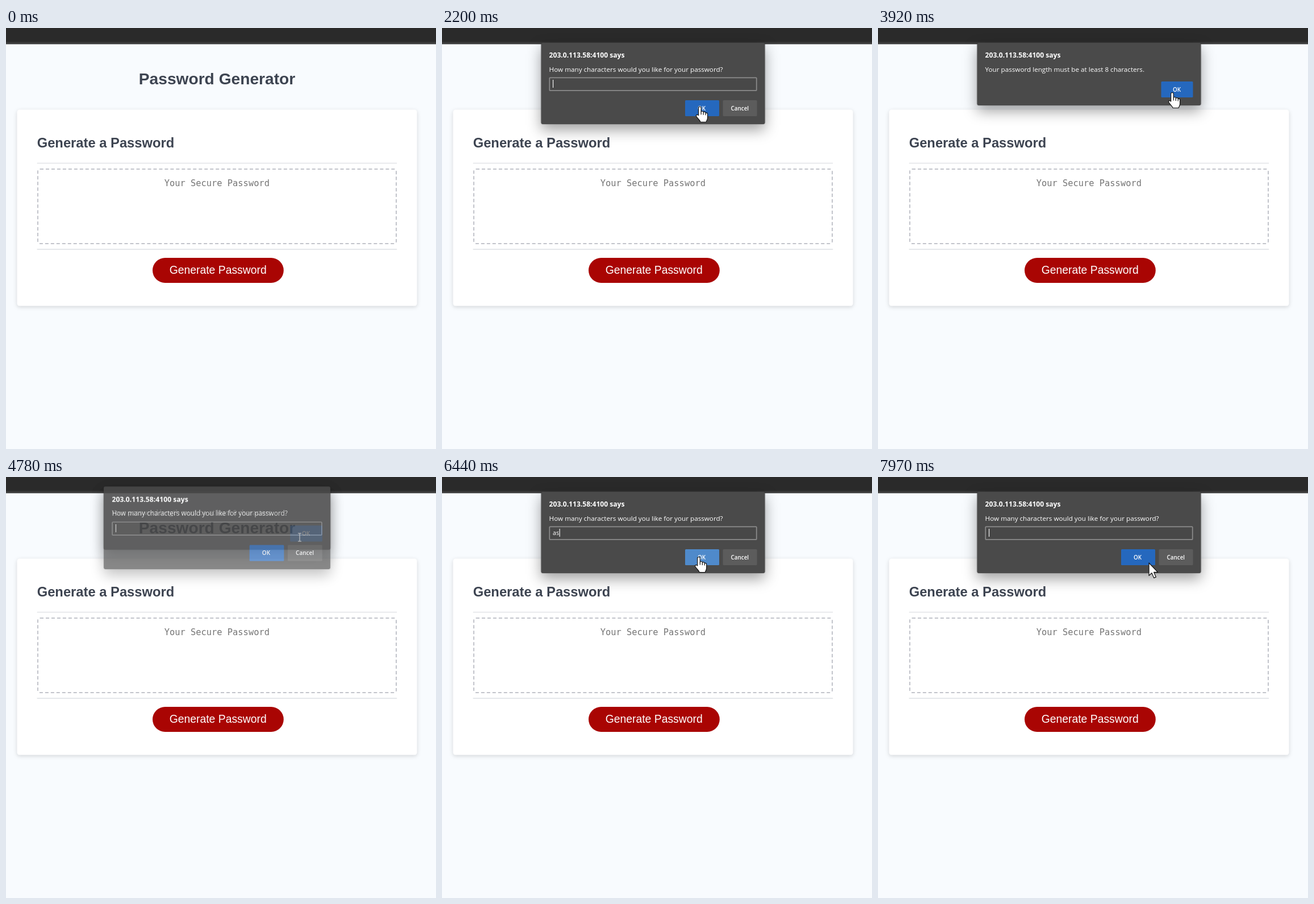
An HTML page for the animation above (8000 ms loop, 757x740 px).

```html
<!DOCTYPE html>
<html lang="en">
<head>
<meta charset="utf-8">
<title>Password Generator</title>
<style>
  html, body { margin: 0; width: 100%; height: 100%; overflow: hidden; background: #f8fbfe; }
  svg { position: absolute; left: 0; top: 0; }
  .field {
    position: absolute; left: 55px; top: 247px; width: 633px; height: 133px;
    box-sizing: border-box; border: 2px dashed #c2c4cb; border-radius: 5px;
  }
  .page { font-family: "Liberation Sans", Arial, sans-serif; fill: #3d4451; }
  .mid { text-anchor: middle; }
  .bold { font-weight: 700; }
  .hint { font: 15.4px "DejaVu Sans Mono", "Noto Sans Mono", monospace; fill: #757575; }
  .card { fill: #fff; filter: drop-shadow(0 2px 3.5px rgba(0, 0, 0, .15)); }
  .dialog { font: 11.68px "Open Sans", "Noto Sans", sans-serif; fill: #fff; }
  .panel {
    fill: #4a4a4a;
    filter: drop-shadow(0 0 1px rgba(0, 0, 0, .3)) drop-shadow(0 10px 12px rgba(0, 0, 0, .37));
  }
  .title { font-size: 12.1px; font-weight: 700; }
  .label { font-size: 9.9px; font-weight: 600; text-anchor: middle; }
  .value { font-size: 10.6px; }
  .box { fill: #484848; stroke: #8c8c8c; stroke-width: 1.7; }
  .closing .box { stroke: #6b7480; }
  .ok { fill: #2568be; }
  .ok.down { fill: #4f8acb; }
  .pointer { fill: #fff; stroke: #111; stroke-width: 1.2; stroke-linejoin: round; }
</style>
</head>
<body>
<svg class="page" width="757" height="740">
  <rect width="757" height="28.5" fill="#3b3b3b"/>
  <rect width="757" height="24.5" fill="#2a2a2a"/>
  <text class="mid bold" x="371.5" y="99" font-size="28.16">Password Generator</text>
  <rect class="card" x="19.5" y="143.5" width="704" height="345" rx="4.4"/>
  <text class="bold" x="54.7" y="210" font-size="23.76">Generate a Password</text>
  <path d="M54.6 237.7H688.2M54.6 389H688.2" stroke="#e5e7ea" stroke-width="1.8"/>
  <text class="hint mid" x="371.3" y="278">Your Secure Password</text>
  <rect x="258" y="404" width="230.8" height="44" rx="22" fill="#a90503"/>
  <text class="mid" x="373.2" y="432" font-size="19.36" fill="#fff">Generate Password</text>
</svg>
<div class="field"></div>
<svg width="757" height="740">
  <g id="dialogs">
    <g class="dialog" id="alert">
      <rect class="panel" x="174.5" y="26" width="394" height="110" rx="3"/>
      <text class="title" x="188.6" y="52">203.0.113.58:4100 says</text>
      <text id="notice" x="188.6" y="76.5"></text>
      <rect class="ok" x="498.5" y="94" width="56" height="28" rx="1.5"/>
      <text class="label" x="526" y="111.5">OK</text>
    </g>
    <g class="dialog" id="prompt">
      <rect class="panel" x="174.5" y="26" width="394" height="143" rx="3"/>
      <text class="title" x="188.6" y="52">203.0.113.58:4100 says</text>
      <text x="188.6" y="76.5">How many characters would you like for your password?</text>
      <rect class="box" x="189.3" y="87.3" width="364.4" height="22.6" rx="1"/>
      <text class="value" id="value" x="195" y="102"></text>
      <rect id="caret" y="91" width="1.1" height="14"/>
      <rect class="ok" x="428" y="127" width="60" height="28" rx="1.5"/>
      <text class="label" x="457" y="144.5">OK</text>
      <rect x="494.5" y="127" width="60" height="28" rx="1.5" fill="#5c5c5c"/>
      <text class="label" x="524.3" y="144.5">Cancel</text>
    </g>
  </g>
  <g id="cursor">
    <path class="pointer" id="arrow" d="M0 0V22.3L5 17.7L8.8 26.4L12.4 24.9L8.7 16.4H15.6Z"/>
    <g class="pointer" id="hand" transform="translate(-7.3)">
      <path d="M5 16V2.8a2.3 2.3 0 0 1 4.6 0V10c0-2 4-2 4 0v1c0-2 4-2 4 .5v1c0-1.8 3.4-1.6 3.4.8V20c0 4-2 5-2.5 7.5H8.5C8 25 4 22 1.2 17.5C0 15 3 13.5 5 16Z"/>
      <path d="M9.6 10v4.5M13.6 11v4M17.6 12.5v3" fill="none"/>
    </g>
    <path id="beam" d="M-3-7H3M0-7V7M-3 7H3" fill="none" stroke="#c9c9c9" stroke-width="1.1"/>
  </g>
</svg>
<script>
  const LOOP = 8000, STEP = 66.4, FADE = 160;
  const $ = id => document.getElementById(id);
  const clamp = v => Math.max(0, Math.min(1, v));
  const within = (t, spans) => spans.some(([a, b]) => t >= a && t < b);

  // Each span: start of opening, start of closing.
  const dialogs = {
    prompt: { spans: [[836, 3492], [4700, 6478], [7475, 9000]], press: [[3450, 3492], [6370, 6478]], cy: 97.5 },
    alert: { spans: [[3492, 4700], [6478, 7475]], press: [[4640, 4700], [7360, 7475]], cy: 81 }
  };
  const typed = [[0, ''], [3240, '2'], [4500, ''], [5765, 'a'], [6030, 'as'], [7000, '']];
  const blinkStarts = [845, 3240, 4700, 5765, 6030, 7475];

  // time, x, y, shape used from that time on
  const path = [
    [0, 730, 770, 'arrow'], [66, 703, 735, 'arrow'], [200, 640, 666, 'arrow'],
    [332, 533, 585, 'arrow'], [465, 433, 497, 'arrow'], [598, 352, 430, 'hand'],
    [797, 350, 419, 'hand'], [1130, 350, 419, 'hand'], [1220, 368, 382, 'arrow'],
    [1660, 450, 147, 'hand'], [1730, 453, 140, 'hand'], [1860, 453, 137, 'hand'],
    [2070, 455, 136, 'hand'], [2280, 453, 139, 'hand'], [3650, 453, 139, 'arrow'],
    [3850, 512, 117, 'hand'], [3918, 518, 113, 'hand'], [4380, 518, 113, 'hand'],
    [4640, 517, 106, 'hand'], [4700, 517, 106, 'beam'], [4860, 517, 106, 'beam'],
    [4900, 514, 113, 'arrow'], [5180, 484, 174, 'arrow'], [5500, 460, 150, 'hand'],
    [5630, 452, 140, 'hand'], [6900, 452, 140, 'arrow'], [7200, 505, 116, 'hand'],
    [7360, 514, 111, 'hand'], [7475, 514, 111, 'arrow'], [7560, 514, 111, 'arrow'],
    [7965, 477, 151, 'arrow'], [9000, 477, 151, 'arrow']
  ];

  const lastAt = (list, t, key) => list.filter(k => key(k) <= t).pop();

  function drawDialog(id, t) {
    const { spans, press, cy } = dialogs[id];
    const el = $(id);
    const span = spans.find(([a, b]) => t >= a && t < b + FADE);
    el.style.display = span ? '' : 'none';
    if (!span) return;
    const closing = t >= span[1];
    const p = clamp((t - span[closing ? 1 : 0]) / FADE);
    const away = closing ? p ** .85 : 1 - p;
    const scale = 1 + .024 * away;
    el.setAttribute('transform',
      `translate(371.5 ${cy - 16 * away}) scale(${scale}) translate(-371.5 ${-cy})`);
    el.style.opacity = closing ? 1 - p ** 1.5 : Math.min(1, 1.7 * p ** 1.4);
    el.classList.toggle('closing', closing);
    el.querySelector('.ok').classList.toggle('down', within(t, press));
    // The newer dialog lies on top.
    if (!closing && el.nextElementSibling) $('dialogs').append(el);
  }

  function drawInput(t) {
    const text = lastAt(typed, t, k => k[0])[1];
    const start = lastAt(blinkStarts, t, k => k) ?? 0;
    const on = Math.floor((t - start) / 535) % 2 === 0;
    $('value').textContent = text;
    $('caret').setAttribute('x', 195 + 5.8 * text.length);
    $('caret').style.display = on && within(t, dialogs.prompt.spans) ? '' : 'none';
    $('notice').textContent = t < 6000
      ? 'Your password length must be at least 8 characters.'
      : 'as is not a number.';
  }

  function drawCursor(t) {
    const i = path.findIndex(k => k[0] > t);
    const [a, b] = [path[i - 1], path[i]];
    const p = (t - a[0]) / (b[0] - a[0]);
    const mix = n => a[n] + (b[n] - a[n]) * p;
    $('cursor').setAttribute('transform', `translate(${mix(1)} ${mix(2)})`);
    for (const id of ['arrow', 'hand', 'beam']) $(id).style.display = id === a[3] ? '' : 'none';
  }

  // The screen refreshes in fixed steps.
  function draw() {
    const t = Math.floor((performance.now() % LOOP + 15) / STEP) * STEP;
    drawDialog('alert', t);
    drawDialog('prompt', t);
    drawInput(t);
    drawCursor(t);
    requestAnimationFrame(draw);
  }
  draw();
</script>
</body>
</html>
```
